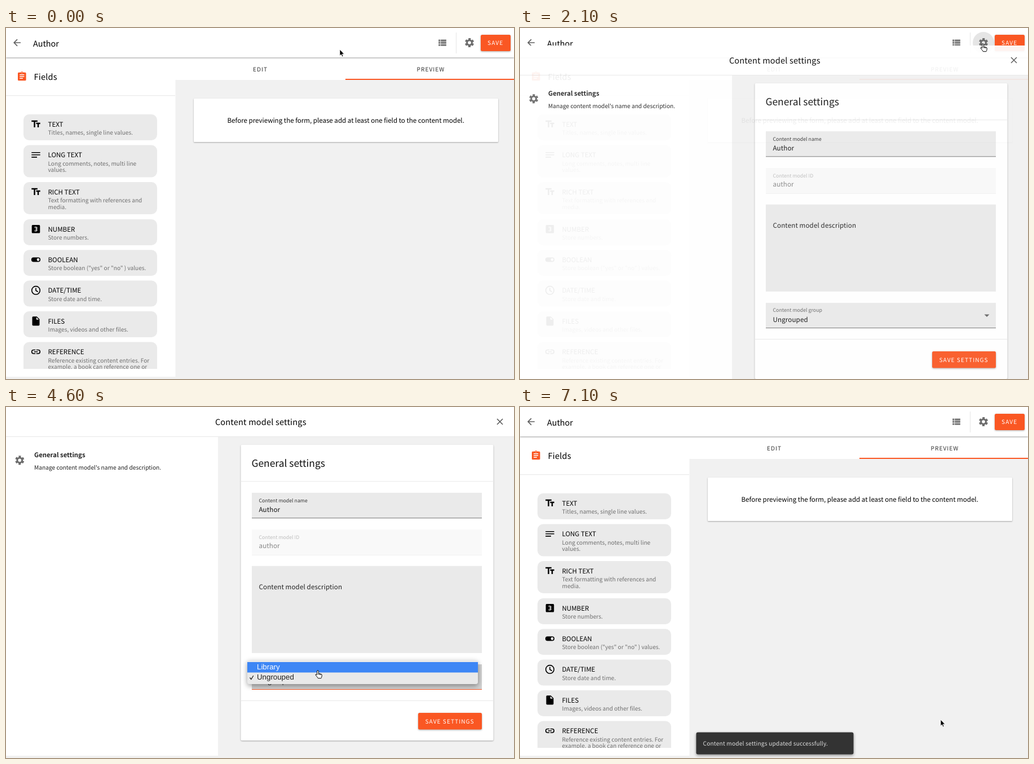
Animation of 901x622 px, one loop 8000 ms. Source, as an HTML page:

```html
<!DOCTYPE html>
<html lang="en">
<head>
<meta charset="utf-8">
<title>Content model settings</title>
<style>
html, body { margin: 0; width: 100%; height: 100%; overflow: hidden; background: #fff; }
svg { display: block; font-family: "Noto Sans CJK JP", "Noto Sans CJK SC", "Noto Sans CJK", "Open Sans", sans-serif; }
text { white-space: pre; text-rendering: geometricPrecision; }
.bar { filter: drop-shadow(0 1px 1.5px rgba(0,0,0,.38)); }
.card { filter: drop-shadow(0 1px 1px rgba(0,0,0,.32)); }
.btn { filter: drop-shadow(0 1px 1.5px rgba(0,0,0,.32)); }
.raised { filter: drop-shadow(0 2px 2.5px rgba(0,0,0,.42)); }
.menu { filter: drop-shadow(0 3px 5px rgba(0,0,0,.38)); }
.mac { font-family: "Liberation Sans", Arial, sans-serif; }
</style>
</head>
<body>
<svg id="stage" width="901" height="622" viewBox="0 0 901 622"></svg>
<script>
const ORANGE = '#fa5723', GREY = '#eaeaea', PAGE = '#f1f1f1';

const rect = (x, y, w, h, fill, more = '') =>
  `<rect x="${x}" y="${y}" width="${w}" height="${h}" fill="${fill}" ${more}/>`;
const text = (x, y, size, str, more = '') =>
  `<text x="${x}" y="${y}" font-size="${size}" ${more}>${str}</text>`;
const spaced = (n, fill = '#000') => `letter-spacing="${n}" fill="${fill}"`;
// Icons are drawn on a 24 unit grid, placed by their centre.
const icon = (x, y, shape, fill = '#000') =>
  `<g transform="translate(${x} ${y}) scale(.81) translate(-12 -12)" fill="${fill}">${shape}</g>`;
const path = d => `<path d="${d}"/>`;

const gear = `<g fill="none" stroke="#6b6b6b"><circle cx="12" cy="12" r="5.4" stroke-width="3.8"/>
  <circle cx="12" cy="12" r="8.3" stroke-width="3.4" stroke-dasharray="4.9 3.792" transform="rotate(13 12 12)"/></g>`;
const letters = path('M2.5 4v3h5v12h3V7h5V4h-13zm19 5h-9v3h3v7h3v-7h3V9z');
const icons = {
  letters,
  lines: path('M2.5 18h12v-2h-12zM2.5 6v2h19V6zm0 7h19v-2h-19z'),
  three: path('M5 3a2 2 0 0 0-2 2v14a2 2 0 0 0 2 2h14a2 2 0 0 0 2-2V5a2 2 0 0 0-2-2zM15 10.5q0 1.5-1.5 1.5 1.5 0 1.5 1.5V15a2 2 0 0 1-2 2H9v-2h4v-2h-2v-2h2V9H9V7h4a2 2 0 0 1 2 2z'),
  toggle: path('M17 7H7a5 5 0 0 0 0 10h10a5 5 0 0 0 0-10zm0 8a3 3 0 1 1 0-6 3 3 0 0 1 0 6z'),
  clock: '<g fill="none" stroke="#000" stroke-width="2"><circle cx="12" cy="12" r="9"/><path d="M12 7v5.5l4.5 2.7"/></g>',
  file: path('M6 2a2 2 0 0 0-2 2v16a2 2 0 0 0 2 2h12a2 2 0 0 0 2-2V8l-6-6zm7 7V3.5L18.5 9z'),
  link: '<path fill="none" stroke="#000" stroke-width="2" d="M11 8H7a4 4 0 0 0 0 8h4M13 8h4a4 4 0 0 1 0 8h-4M8 12h8"/>',
  board: path('M19 3h-4.2a3 3 0 0 0-5.6 0H5a2 2 0 0 0-2 2v14a2 2 0 0 0 2 2h14a2 2 0 0 0 2-2V5a2 2 0 0 0-2-2zm-7 0a1 1 0 1 1 0 2 1 1 0 0 1 0-2zm2 14H7v-2h7zm3-4H7v-2h10zm0-4H7V7h10z'),
  back: path('M20 11H7.8l5.6-5.6L12 4l-8 8 8 8 1.4-1.4L7.8 13H20z'),
  list: path('M3.5 5h4v4h-4zm0 5h4v4h-4zm0 5h4v4h-4zm5-10h12v4h-12zm0 5h12v4h-12zm0 5h12v4h-12z')
};

const fields = [
  ['letters', 153, 46, 'TEXT', 'Titles, names, single line values.'],
  ['lines', 207.5, 57, 'LONG TEXT', 'Long comments, notes, multi line', 'values.'],
  ['letters', 273, 57, 'RICH TEXT', 'Text formatting with references and', 'media.'],
  ['three', 339, 46, 'NUMBER', 'Store numbers.'],
  ['toggle', 393.2, 46, 'BOOLEAN', 'Store boolean ("yes" or "no" ) values.'],
  ['clock', 447.6, 46, 'DATE/TIME', 'Store date and time.'],
  ['file', 502, 46, 'FILES', 'Images, videos and other files.'],
  ['link', 556.5, 60, 'REFERENCE', 'Reference existing content entries. For', 'example, a book can reference one or']
];
const fieldCard = ([name, y, h, title, ...lines]) =>
  rect(31, y, 237, h, GREY, 'rx="10"') + icon(53, y + 17.3, icons[name]) +
  text(74.5, y + 21.8, 11.55, title) +
  lines.map((s, i) => text(74.5, y + 36.2 + i * 11.5, 10.14, s, 'fill="#6f6f6f"')).join('');

const main =
  rect(0, 0, 901, 622, PAGE) + rect(0, 40, 300.5, 578, '#fff') + rect(300, 40, 601, 52, '#fff') +
  rect(602, 90, 299, 2, ORANGE) +
  text(438, 76.6, 10.14, 'EDIT', spaced(1.05, '#333')) +
  text(728.5, 76.6, 10.14, 'PREVIEW', spaced(1.05, '#333')) +
  rect(0, 0, 901, 52, '#fff', 'class="bar"') +
  icon(19.5, 26, icons.back, '#5f5f5f') + text(48, 32.5, 14.4, 'Author') +
  icon(774, 26.2, icons.list, '#757575') + rect(798, 8, 1, 37, '#e6e6e6') +
  '<circle id="halo" cx="822" cy="26" r="19"/>' + icon(822, 26, gear) +
  rect(842, 12, 53, 29, ORANGE, 'rx="2.5" class="btn"') +
  text(854, 30.3, 10.14, 'SAVE', spaced(1.1, '#fff')) +
  icon(28.3, 86, icons.board, ORANGE) + text(49.5, 92, 14.55, 'Fields', spaced(.2)) +
  rect(0, 119.3, 300, 1, '#e6e6e6') + fields.map(fieldCard).join('') +
  rect(0, 604, 300, 14, '#fff') +
  rect(333, 125, 540, 77, '#fff', 'rx="1" class="card"') +
  text(602.7, 168, 11.57, 'Before previewing the form, please add at least one field to the content model.', 'text-anchor="middle"');

const tip = '<g id="tip"><path fill="#00ccb0" d="M691.5 50H788l5-5 5 5h96.500v49h-203z"/>' +
  ['TO VIEW THE CONTENT, YOU', 'FIRST NEED TO ADD A FIELD AND', 'SAVE THE FORM'].map((s, i) =>
    text(794, 65.6 + i * 12.3, 8.05, s, 'font-weight="700" text-anchor="middle" ' + spaced(1.95, '#fff'))).join('') + '</g>';

const label = (y, s, fill, more = '') => text(448.5, y, 8.78, s, `fill="${fill}" ${more}`);
const value = (y, s, fill = '#111', more = '') => text(448.5, y, 11.6, s, spaced(.12, fill) + more);
const dialog = '<g id="dialog">' +
  rect(0, 0, 901, 640, PAGE) + rect(0, 0, 376, 618, '#fff') + rect(0, 0, 901, 52, '#fff') +
  rect(0, 52, 901, 1, '#e8e8e8') +
  text(451.8, 32, 14.5, 'Content model settings', 'text-anchor="middle" ' + spaced(.2)) +
  '<path d="M871 21l10 10m0-10l-10 10" stroke="#555" stroke-width="1.5"/>' +
  icon(24.3, 94.3, gear) +
  text(50, 88.6, 11.35, 'General settings', 'font-weight="700" fill="#222"') +
  text(50, 110.5, 10.2, "Manage content model's name and description.", 'fill="#222"') +
  rect(416.5, 67, 448, 524, '#fff', 'rx="2" class="card"') +
  text(435.5, 106, 17.4, 'General settings', 'fill="#111"') +
  rect(416.5, 131.3, 448, 1, '#e8e8e8') + rect(416.5, 520, 448, 1, '#e8e8e8') +
  rect(436, 152, 408, 45, GREY) + rect(436, 196.3, 408, 1, '#777') +
  label(168.6, 'Content model name', '#333') + value(185.5, 'Author') +
  rect(436, 217, 408, 45.5, '#f9f9f9') + rect(436, 262, 408, .7, '#eee') +
  label(233.5, 'Content model ID', '#bdbdbd') + value(250.3, 'author', '#858585') +
  rect(436, 281.7, 408, 154.3, GREY) + value(322.5, 'Content model description', '#222') +
  rect(436, 456, 408, 45, GREY, 'id="select"') + rect(436, 500, 408, 1, '#777', 'id="line"') +
  label(472, 'Content model group', '#666', 'id="group"') + value(489.8, '', '#111', ' id="choice"') +
  '<path d="M823.500 476.500h9l-4.500 4.500z" fill="#666"/>' +
  rect(731, 542, 113, 29.5, ORANGE, 'rx="2.5" id="save"') +
  text(743.5, 560.6, 10.14, 'SAVE SETTINGS', spaced(1.05, '#fff')) +
  '<g id="menu" class="mac">' + rect(428, 449, 409, 42, '#e9e9e9', 'rx="4" class="menu"') +
  rect(428, 452, 409, 18.5, '#3d86f5', 'id="mark"') +
  text(445, 465, 13.3, 'Library', 'id="first"') + text(445, 482.6, 13.3, 'Ungrouped', 'id="second"') +
  '<path id="tick" d="M432.500 479.500l2.300 3 4-6.500" fill="none" stroke-width="1.300"/></g></g>';

const toast = '<g id="toast">' + rect(312.5, 576.5, 279, 39, '#333', 'rx="3" class="raised"') +
  text(324.5, 600.3, 10.16, 'Content model settings updated successfully.', spaced(.18, '#dedede')) + '</g>';

const cursors = `<g id="cursor">
  <path id="arrow" d="M0 0v11.200l2.500-2.300 1.800 4 1.800-.8-1.800-3.900h3.500z" stroke="#fff" stroke-width=".8"/>
  <path id="hand" d="M-1.300 1.200a1.300 1.300 0 0 1 2.600 0v4l4.600 1.100q1.600.5 1.400 2.200l-.4 2.600q-.2 1.300-1 2.600H.4q-.8-1.700-2.300-3.300l-2-2.500q-.3-1.600 1.200-1.300l1.400 1.200zM1.300 5.500v2M3.300 6v1.800M5.200 6.500V8" fill="#fff" stroke="#000"/>
  <path id="beam" d="M-3-6q2.500 0 3 1.300Q.5-6 3-6M0-4.700v9.400M-3 6q2.500 0 3-1.300Q.5 6 3 6" fill="none" stroke="#111"/></g>`;

document.getElementById('stage').innerHTML = main + tip + dialog + toast + cursors;

const el = {};
document.querySelectorAll('[id]').forEach(e => el[e.id] = e);
const set = (id, attrs) => { for (const k in attrs) el[id].setAttribute(k, attrs[k]); };
const ramp = (t, a, b) => Math.min(1, Math.max(0, (t - a) / (b - a)));
const within = (t, a, b) => t >= a && t < b;

// Pointer route: time, x, y
const route = [[0, 592, 38], [100, 606, 38], [700, 606, 38], [1050, 779, 34], [1500, 821, 28], [2600, 821, 28],
  [2900, 624, 290], [3400, 560, 475], [3550, 560, 475], [4250, 553, 467], [4650, 553, 467],
  [5400, 600, 490], [5450, 600, 490], [6100, 746, 554], [8000, 746, 554]];
const shapes = [[0, 'arrow'], [1550, 'hand'], [2250, 'arrow'], [2800, 'beam'], [3150, 'arrow'], [3350, 'hand'],
  [5600, 'arrow'], [6000, 'hand'], [6500, 'arrow']];

function pointer(t) {
  const i = route.findIndex(p => p[0] > t), [a, x, y] = route[i - 1], [b, u, v] = route[i];
  const k = ramp(t, a, b);
  set('cursor', { transform: `translate(${x + (u - x) * k} ${y + (v - y) * k})` });
  const now = shapes.filter(s => s[0] <= t).pop()[1];
  for (const id of ['arrow', 'hand', 'beam']) set(id, { visibility: now === id ? 'visible' : 'hidden' });
}

function draw(t) {
  set('halo', { 'fill-opacity': within(t, 1750, 6400) ? .1 : within(t, 1500, 1750) ? .04 : 0 });
  set('tip', { opacity: .85 * Math.min(ramp(t, 900, 1155), 1 - ramp(t, 1250, 1500)) });

  const shown = t < 4000 ? 1 - (1 - ramp(t, 1880, 2250)) ** 3 : 1 - ramp(t, 6280, 6520) ** 2;
  set('dialog', { opacity: shown, transform: `translate(0 ${466 * (1 - shown)})` });

  const focus = t >= 3550, picked = t >= 4700;
  set('select', { fill: focus ? '#d1d1d1' : GREY });
  set('line', { fill: focus && !picked ? ORANGE : '#777' });
  set('group', { fill: focus ? '#e8603a' : '#666' });
  el.choice.textContent = picked ? 'Library' : 'Ungrouped';

  const first = t >= 4400, second = t < 4150;
  set('menu', { opacity: t < 3650 ? 0 : 1 - ramp(t, 4700, 4900) });
  set('mark', { y: first ? 452 : 469.5, opacity: +(first || second) });
  set('first', { fill: first ? '#fff' : '#222' });
  set('second', { fill: second ? '#fff' : '#222' });
  set('tick', { stroke: second ? '#fff' : '#222' });

  const hover = t >= 6000;
  set('save', { fill: hover ? '#fc6638' : ORANGE, class: hover ? 'raised' : 'btn' });

  const pop = ramp(t, 6400, 6550), size = .8 + .2 * pop;
  set('toast', { opacity: pop, transform: `translate(452 596) scale(${size}) translate(-452 -596)` });
  pointer(t);
}

const start = performance.now();
function frame() {
  const t = (performance.now() - start) % 8000;
  draw(Math.floor(t / 50) * 50);
  requestAnimationFrame(frame);
}
frame();
</script>
</body>
</html>
```
